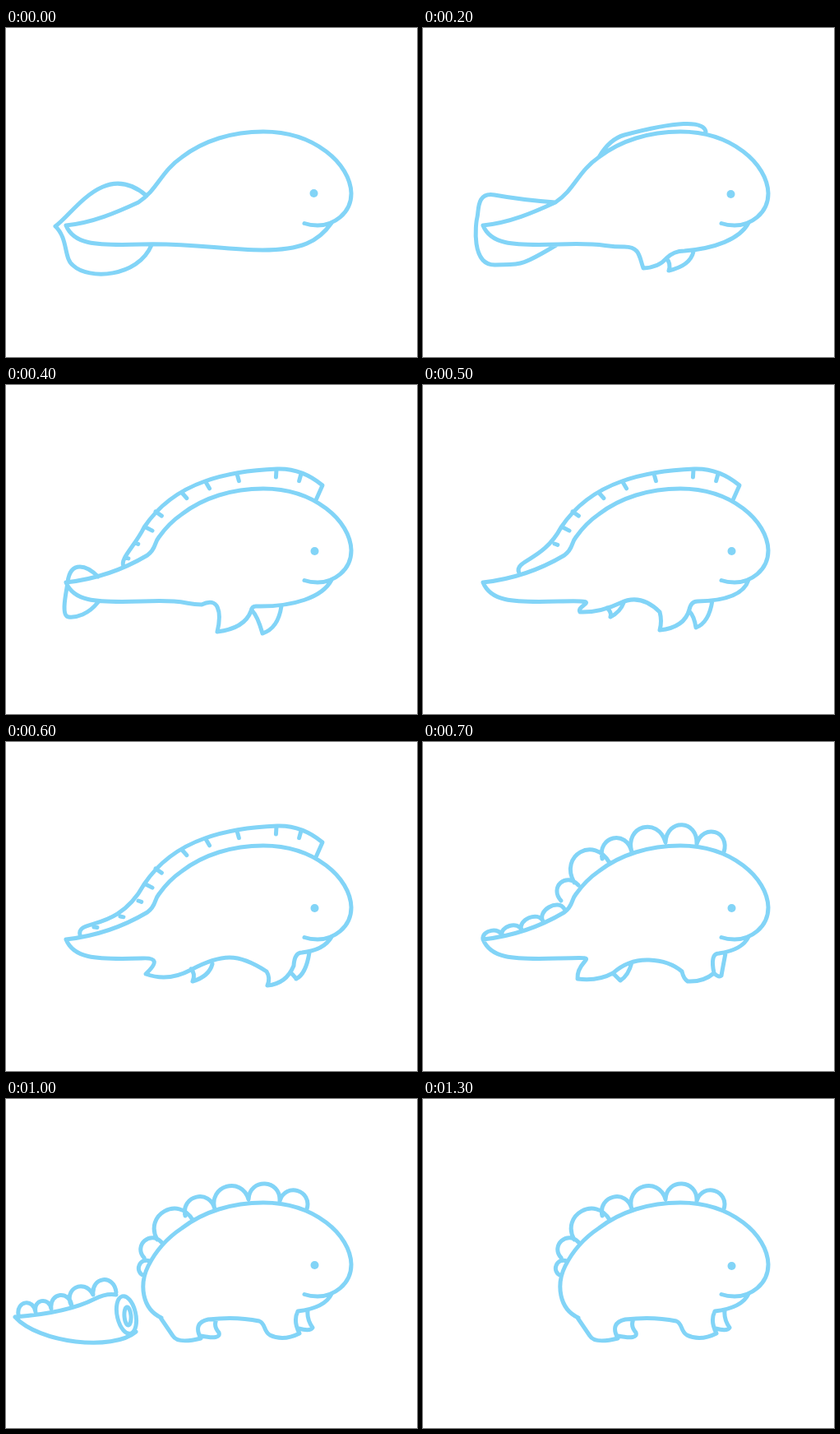
An HTML page for the animation above (1800 ms loop, 500x400 px).

```html
<!DOCTYPE html>
<html lang="en">
<head>
<meta charset="utf-8">
<title>Fish to dinosaur</title>
<style>
html, body { margin: 0; width: 100%; height: 100%; overflow: hidden; background: #fff; }
svg { display: block; width: 100%; height: 100%; }
</style>
</head>
<body>
<svg viewBox="0 0 500 400">
  <path id="line" fill="none" stroke="#82d4f7" stroke-width="5" stroke-linecap="round" stroke-linejoin="round"/>
  <circle id="eye" r="5" fill="#82d4f7"/>
</svg>
<script>
const line = document.getElementById('line');
const eye = document.getElementById('eye');

// Halfway shape between two paths with the same commands
const mid = (a, b) => {
  const n = b.match(/[\d.]+/g);
  let i = 0;
  return a.replace(/[\d.]+/g, v => (+v + +n[i++]) / 2);
};

// Round plates standing on a chain of base points
const plates = (h, ...p) => {
  let d = `M${p[0]} ${p[1]}`;
  for (let i = 2; i < p.length; i += 2) {
    const [x, y, u, v] = p.slice(i - 2, i + 2);
    const nx = (v - y) * -h, ny = (u - x) * h;
    d += `C${x + nx} ${y + ny} ${u + nx} ${v + ny} ${u} ${v}`;
  }
  return d;
};

// Small fin or foot: start, tip, end
const claw = (x, y, tx, ty, ex, ey) =>
  `M${x} ${y}Q${x + 6} ${y + 6} ${tx} ${ty}Q${ex - 4} ${ty - 6} ${ex} ${ey}`;

// Fin ray pointing at the middle of the body
const ray = ([x, y]) => {
  const dx = 320 - x, dy = 250 - y;
  const k = (x < 165 ? 4 : 9) / Math.hypot(dx, dy);
  return `M${x} ${y}l${dx * k} ${dy * k}`;
};

const oval = (x, y, dx, dy, rx, tilt) => {
  const arc = `a${rx} ${dy / 2} ${tilt} 0 1 `;
  return `M${x} ${y}${arc}${dx} ${dy}${arc}${-dx} ${-dy}`;
};

const head = 'C240 137 275 126 313 126C375 126 419 165 420 201C420 226 398 240 379 240Q370 240 363 237.5';
const fishBack = 'M73 240C105 237 135 224 161 212C185 196 188 175 214 157' + head;
const finBack = 'M73 240C110 236 145 223 172 207C183 199 180 192 186 185Q198 168 214 157' + head;
const dinoBack = 'M64 272C100 260 145 243 160 225S183 180 214 157' + head;
const stumpBack = 'M189 266C165 255 162 225 173 203Q187 175 214 157' + head;

const under = 'M73 240C82 262 105 265 165 263';
const jaw = ' 396 237';

const whaleBelly = under + 'S265 270 312 270S380 260' + jaw;
const fishBelly = under + 'S215 266 245 266C264 266 263 278 268 292Q287 291 296 280Q305 271 318 271C355 268 385 257' + jaw;
const finBelly = under + 'S215 267 238 267C258 257 263 275 257 300Q290 296 298 275Q299 269 304 269C350 270 385 258' + jaw;
const climbBelly = under + 'S185 267 191 276Q215 277 240 265T288 276Q291 287 288 298Q318 295 324 273Q326 263 334 263Q388 262' + jaw;
const crawlBelly = under + 'C184 262 185 268 170 282Q197 292 225 277T272 262T317 279Q322 287 318 296Q341 294 350 272Q351 256 360 256Q387 253' + jaw;
const walkBelly = under + 'S186 262 188 288Q213 291 231 281Q250 264 275 265T315 279Q317 288 322 291Q341 292 354 281Q349 257 360 257Q388 253' + jaw;

const whaleTail = 'M171 204C120 160 82 226 60 241C76 256 70 281 82 289C100 306 160 304 177 264';
const fishTail = 'M161 212Q120 209 87 203C65 199 68 222 66 230S58 289 88 288S117 291 162 264';
const smallTail = 'M112 233Q100 221 90 221C79 221 76 231 75 240S66 281 76 282S100 279 112 264';

const fishFin = claw(296, 280, 299, 295, 329, 272);
const longFin = claw(300, 275, 312, 302, 335, 269);

const crestTop = 'C182 152 205 130 242 117C270 107 305 103 330 102Q360 101 385 122L377 140';
const crest = 'M143 220C138 212 158 194 168 173' + crestTop;
const longCrest = 'M90 235C85 214 135 233 168 173' + crestTop;
const rays = [[170, 173], [182, 154], [214, 131], [243, 118], [281, 108], [329, 103], [359, 108]].map(ray).join('');

const topPlates = h => plates(h, 366, 134, 333, 124, 295, 122, 254, 134, 218, 142) +
  plates(h, 227, 147, 184, 171) + plates(h, 189, 174, 168, 193);
const dino = topPlates(.7) +
  'M188 266L203 288Q209 298 237 291Q227 272 246 268Q280 264 308 270C316 273 313 282 321 287Q337 295 357 285Q349 270 355 258Q388 254' + jaw +
  'M237 288Q262 293 259 284Q252 276 256 268M367 258Q366 268 373 278Q370 283 356 279';
const stump = dino + stumpBack + plates(.7, 175, 197, 168, 215);
const cutTail = 'M11 265Q75 260 108 243Q122 236 134 238M11 265C40 297 130 307 158 283' +
  plates(.8, 134, 235, 106, 238, 80, 252, 55, 255, 36, 259, 15, 262) +
  oval(141, 240, 11, 45, 11, -12) + oval(147, 253, 2, 22, 4, -4);

const poses = [
  [0, fishBack, whaleBelly, whaleTail],
  [200, fishBack, fishBelly, fishTail, fishFin,
    'M214 157Q227 135 245 130Q340 105 344 126'],
  [300, finBack, mid(fishBelly, finBelly), mid(fishTail, smallTail), mid(fishFin, longFin),
    'M180 193C183 163 230 109 330 109Q364 108 365 123L361 133'],
  [400, finBack, finBelly, smallTail, longFin, crest, rays, ray([145, 210]), ray([157, 192])],
  [500, finBack, climbBelly, mid(crest, longCrest), rays, ray([160, 193]),
    claw(324, 275, 332, 295, 352, 262), claw(224, 271, 228, 282, 244, 265)],
  [600, finBack, crawlBelly, longCrest, rays, ray([107, 225]), ray([139, 212]), ray([161, 193]),
    claw(347, 281, 353, 288, 369, 256), claw(225, 276, 227, 291, 251, 270)],
  [700, finBack, walkBelly, topPlates(.78), plates(.5, 172, 203, 146, 218, 120, 229, 96, 236, 73, 240),
    claw(354, 281, 363, 284, 368, 257), claw(231, 281, 240, 290, 254, 268)],
  [800, dino, dinoBack, 'M64 272Q157 300 190 262',
    plates(.7, 176, 197, 158, 216, 141, 233, 121, 242, 103, 249, 85, 259), 'Q78 252 64 267'],
  [1000, stump, cutTail],
  [1300, stump]
].map(([t, ...parts]) => [t, parts.join('')]);

function draw(now) {
  const t = now % 1800;
  line.setAttribute('d', poses.findLast(p => p[0] <= t)[1]);
  eye.setAttribute('cx', t < 400 ? 374.5 : 375.5);
  eye.setAttribute('cy', t < 200 ? 201 : t < 1300 ? 202 : 203);
  requestAnimationFrame(draw);
}
draw(0);
</script>
</body>
</html>
```
